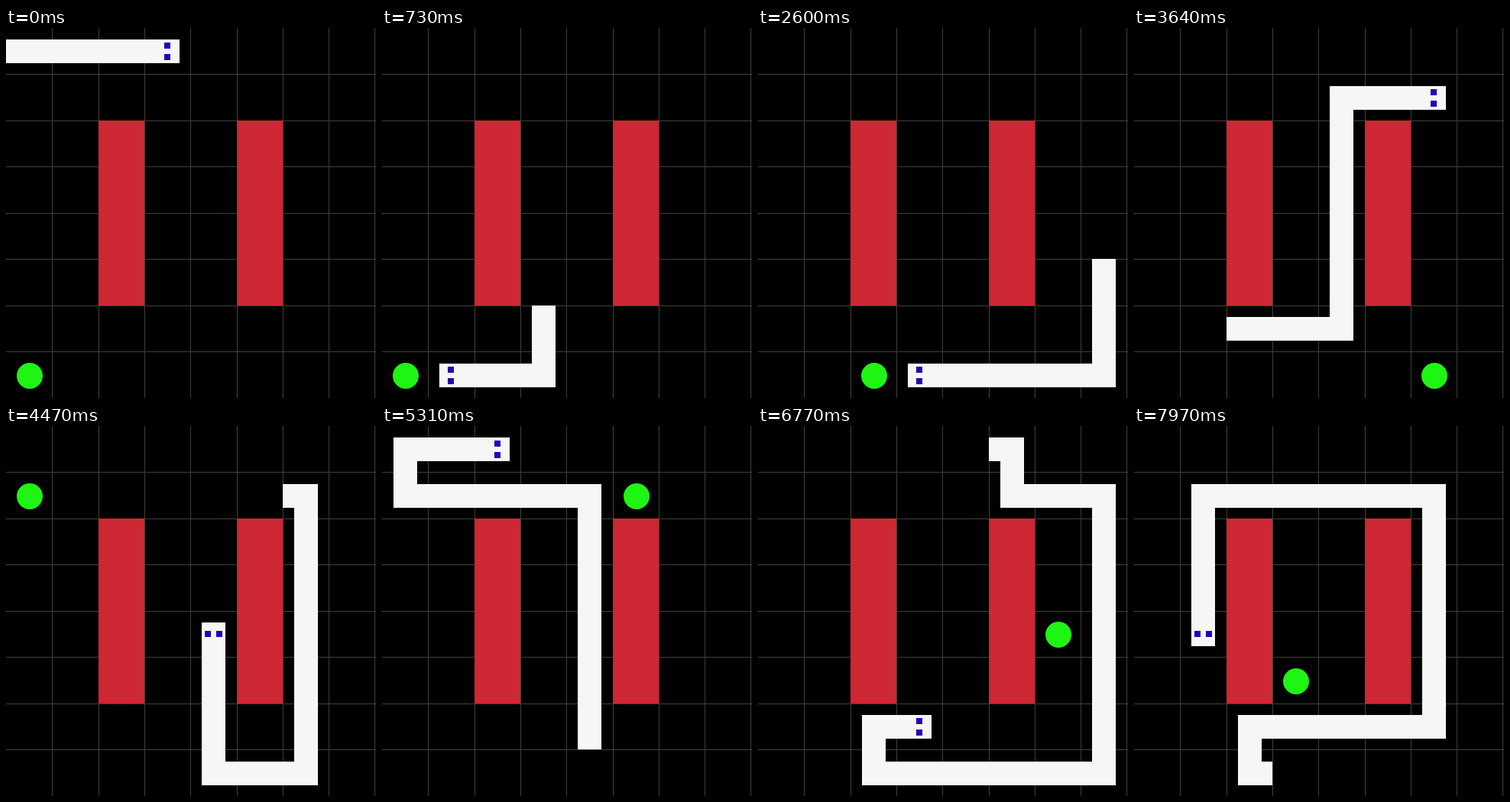
Animation of 484 by 484 pixels, one loop 8 s. Source, as an HTML page with a canvas:

```html
<!DOCTYPE html>
<html lang="en">
<head>
<meta charset="utf-8">
<title>Snake</title>
<style>
html, body { margin: 0; width: 100%; height: 100%; overflow: hidden; background: #000; }
canvas { display: block; width: 484px; height: 484px; }
</style>
</head>
<body>
<canvas id="stage" width="484" height="484"></canvas>
<script>
const ctx = document.getElementById('stage').getContext('2d');
const SIZE = 484, LOOP = 8000, BODY = 31, START_LENGTH = 4;
const CELL_W = 60.3, CELL_H = 60.45;
const COLORS = {
  grid: '#3f3f39', wall: '#cd2833', snake: '#f6f6f4', eye: '#2400b8', food: '#1ff513'
};
const STEPS = { U: [0, -1], D: [0, 1], L: [-1, 0], R: [1, 0] };
const ROUTE = 'D7 L3 U1 R4 U5 R3 D6 L6 U1 R3 U5 R2 D6 L2 U6 L4 U1 R5 D1 R2 D6 L5 U1 R4 U5 L5 D3';

// Moves at which food is eaten; each food lies where the head is then.
const MEALS = [10, 18, 27, 34, 36, 45, 52, 57, 64, 71, 76, 80, 84, 91, 98];
const LAST_FOOD = [3, 5];

const edgeX = c => Math.round(c * CELL_W);
const edgeY = r => Math.round(r * CELL_H);
const boxX = c => Math.round(c * CELL_W + 15);
const boxY = r => Math.round(r * CELL_H + 15.4);

// The cell before the tail comes first, then the starting body.
const path = [[-1, 0], [0, 0], [1, 0], [2, 0], [3, 0]];
for (const leg of ROUTE.split(' ')) {
  const [dx, dy] = STEPS[leg[0]];
  for (let i = 0; i < +leg.slice(1); i++) {
    const [x, y] = path[path.length - 1];
    path.push([x + dx, y + dy]);
  }
}
const MOVES = path.length - 1 - START_LENGTH;
const cellAt = move => path[move + START_LENGTH];

// The game speeds up slightly as it goes on.
const moveTime = n => -55 + 80.5 * n - 0.02 * n * n;

function moveAt(t) {
  let n = 0;
  while (n < MOVES && moveTime(n + 1) <= t) n++;
  return n;
}

function drawBoard() {
  ctx.fillStyle = '#000';
  ctx.fillRect(0, 0, SIZE, SIZE);
  ctx.fillStyle = COLORS.grid;
  for (let i = 1; i <= 8; i++) {
    ctx.fillRect(edgeX(i), 0, 1, SIZE);
    ctx.fillRect(0, edgeY(i), SIZE, 1);
  }
  ctx.fillStyle = COLORS.wall;
  for (const c of [2, 5]) {
    ctx.fillRect(edgeX(c), edgeY(2), edgeX(c + 1) - edgeX(c), edgeY(6) - edgeY(2));
  }
}

function drawFood([c, r]) {
  ctx.fillStyle = COLORS.food;
  ctx.beginPath();
  ctx.arc(boxX(c) + 16, boxY(r) + 16, 17, 0, Math.PI * 2);
  ctx.fill();
}

function drawLink([ax, ay], [bx, by]) {
  const x = boxX(Math.min(ax, bx)), y = boxY(Math.min(ay, by));
  ctx.fillRect(x, y, boxX(Math.max(ax, bx)) + BODY - x, boxY(Math.max(ay, by)) + BODY - y);
}

function drawSnake(move, length) {
  const head = move + START_LENGTH, tail = head - length + 1;
  ctx.fillStyle = COLORS.snake;
  for (let i = tail + 1; i <= head; i++) drawLink(path[i - 1], path[i]);

  // The tail reaches to the border of the cell it came from.
  const [tx, ty] = path[tail];
  ctx.save();
  ctx.beginPath();
  ctx.rect(edgeX(tx), edgeY(ty), edgeX(tx + 1) - edgeX(tx), edgeY(ty + 1) - edgeY(ty));
  ctx.clip();
  drawLink(path[tail - 1], path[tail]);
  ctx.restore();

  const [hx, hy] = path[head];
  const sideways = path[head - 1][1] === hy;
  const ex = boxX(hx) + 11, ey = boxY(hy) + 11;
  ctx.fillStyle = COLORS.eye;
  for (const off of [-7, 8]) {
    ctx.fillRect(ex + (sideways ? 0 : off), ey + (sideways ? off : 0), 8, 8);
  }
}

function drawPointer() {
  ctx.fillStyle = '#fff';
  ctx.beginPath();
  ctx.moveTo(479, 237);
  ctx.lineTo(486, 245);
  ctx.lineTo(479, 253);
  ctx.fill();
}

function draw(t) {
  const move = moveAt(t);
  const eaten = MEALS.filter(m => m <= move).length;
  drawBoard();
  drawFood(eaten < MEALS.length ? cellAt(MEALS[eaten]) : LAST_FOOD);
  drawSnake(move, START_LENGTH + eaten);
  if (t >= 800 && t < 1600) drawPointer();
}

const begin = performance.now();
function tick() {
  draw((performance.now() - begin) % LOOP);
  requestAnimationFrame(tick);
}
tick();
</script>
</body>
</html>
```
